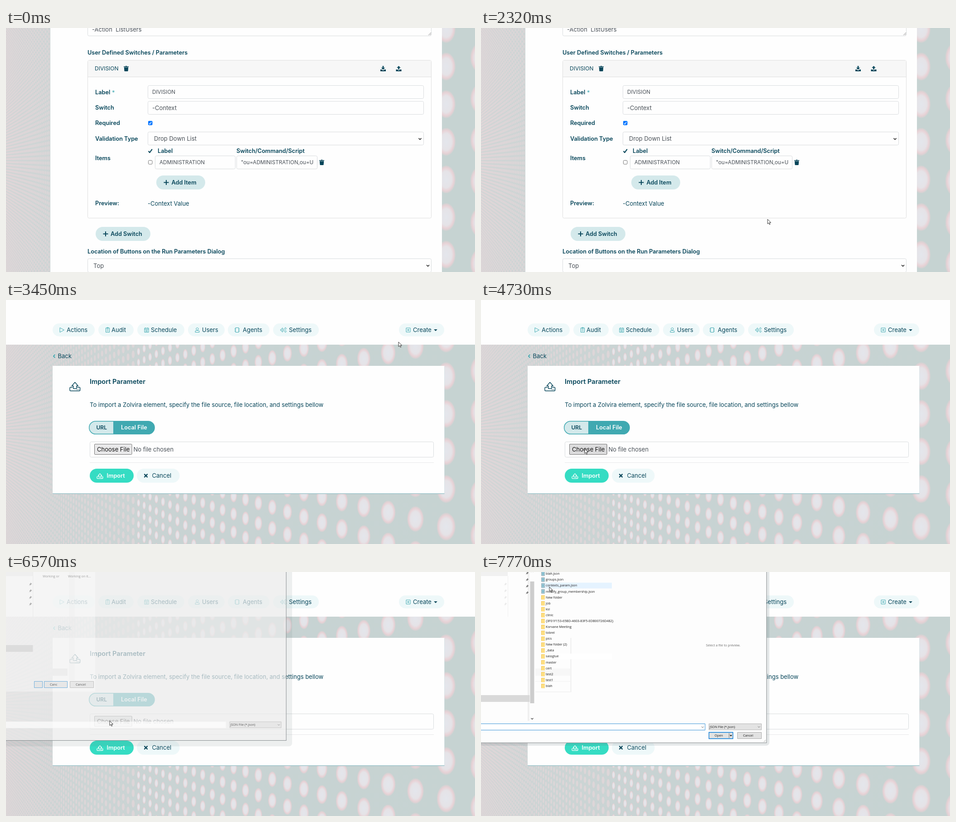
An HTML page with a canvas that plays this animation: 1036 px wide and 541 px high, repeating every 8000 ms.

```html
<!DOCTYPE html>
<html lang="en">
<head>
<meta charset="utf-8">
<title>Import parameter</title>
<style>
html, body { margin: 0; width: 100%; height: 100%; overflow: hidden; }
canvas { display: block; width: 1036px; height: 541px; }
</style>
</head>
<body>
<canvas id="stage" width="1036" height="541"></canvas>
<script>
const W = 1036, H = 541, LOOP = 8000;
const INK = '#07465a', TEAL = '#40a9b1', GREY = '#495057', LINE = '#d9dcde', PANEL = '#fefefe';
const UI = 'Inter, sans-serif', SYS = '"Open Sans", sans-serif';
const screen = document.getElementById('stage').getContext('2d');
let g = screen;

const clamp = v => Math.max(0, Math.min(1, v));
const ease = v => { v = clamp(v); return v * v * (3 - 2 * v); };

function layer(draw) {
  const c = document.createElement('canvas');
  c.width = W; c.height = H;
  g = c.getContext('2d');
  draw();
  g = screen;
  return c;
}

function rect(x, y, w, h, fill) {
  g.fillStyle = fill;
  g.fillRect(x, y, w, h);
}

function box(x, y, w, h, r, fill, stroke, width = 1) {
  g.beginPath();
  g.roundRect(x, y, w, h, r);
  if (fill) { g.fillStyle = fill; g.fill(); }
  if (stroke) { g.strokeStyle = stroke; g.lineWidth = width; g.stroke(); }
}

function text(s, x, y, color = INK, size = 13, weight = 400, family = UI) {
  g.font = `${weight} ${size}px ${family}`;
  g.fillStyle = color;
  g.fillText(s, x, y + size * 0.35);
}
const bold = (s, x, y, color = INK, size = 12.7) => text(s, x, y, color, size, 600);
const small = (s, x, y, color = '#1b1b1b', size = 7.2) => text(s, x, y, color, size, 400, SYS);

// Icons are centred on (x, y); a zero width means filled.
function icon(d, x, y, color, width = 0, scale = 1) {
  g.save();
  g.translate(x, y);
  g.scale(scale, scale);
  const p = new Path2D(d);
  if (width) { g.strokeStyle = color; g.lineWidth = width; g.lineJoin = 'round'; g.stroke(p); }
  else { g.fillStyle = color; g.fill(p); }
  g.restore();
}

const TRASH = 'M-5.5-5h3.5l.8-1h2.4l.8 1h3.5v1.5h-11zM-4.7-2.7h9.4l-.6 7.6q-.1 1.1-1.2 1.1h-5.8q-1.1 0-1.2-1.1z';
const TRAY = 'M-6 2h3.2l1.6 1.7h2.4l1.6-1.7h3.2v4h-12z';
const DOWN = TRAY + 'M-1.3-6h2.6v4h3l-4.3 4.4-4.3-4.4h3z';
const UP = TRAY + 'M-1.3 2.2h2.6v-3.8h3l-4.3-4.4-4.3 4.4h3z';
const UPLOAD = 'M-3.5 6v-6h-3.5l7-8 7 8h-3.5v6zM-5 3h-4.5q-1.8 0-1.8 1.8v4.4q0 1.8 1.8 1.8h19q1.8 0 1.8-1.8v-4.4q0-1.8-1.8-1.8h-4.5M4 8h1.6M7.5 8h1.6';
const PLUS = 'M-5.5 0h11M0-5.5v11';
const CHEVRON = 'M-3-1.6l3 3 3-3';
const CROSS = 'M-3.6-3.6l7.2 7.2M3.6-3.6l-7.2 7.2';
const TICK = 'M-4.3.5l2.8 3.2 5.3-7.6';
const POINTER = 'M0 0v10.3l2.4-2.2 1.8 3.8 1.6-.8-1.7-3.6h3.3z';
const PIN = 'M0-3.5l3.5 3-1.3.2-1.5 1.7-.2 1.4-1.2-1.2-2.7 2.2 2-2.9-1.2-1.3 1.4-.2 1.3-1.5z';

// Perspective wall of glowing dots that shrink towards the left.
function drawWall() {
  const base = g.createLinearGradient(0, 0, W, 0);
  base.addColorStop(0, '#cfd5d5');
  base.addColorStop(0.4, '#c8d3d3');
  base.addColorStop(1, '#c6d3d2');
  rect(0, 0, W, H, base);
  for (let u = 15; u < 104; u++) {
    const d = 18436 / u, x = d - 180;
    const gapX = d * d / 18436, gapY = 84 * (d / 1158) ** 1.4;
    const rx = Math.max(1.2, gapX * 0.25), ry = gapY * 0.32;
    const rows = Math.ceil(300 / gapY);
    for (let j = -rows; j < rows; j++) {
      g.save();
      g.translate(x, 294 + (j + 0.5) * gapY);
      g.scale(rx, ry);
      if (rx > 3) {
        const glow = g.createRadialGradient(0, 0, 0, 0, 0, 1.15);
        glow.addColorStop(0, '#e4e6ec');
        glow.addColorStop(0.6, '#e5e3e7');
        glow.addColorStop(0.83, '#e8d2d6');
        glow.addColorStop(1, '#e2d0d360');
        glow.addColorStop(1, '#e2d0d300');
        g.fillStyle = glow;
      } else g.fillStyle = '#e5d6d9b0';
      g.beginPath();
      g.arc(0, 0, 1.15, 0, 7);
      g.fill();
      g.restore();
    }
  }
}

function field(x, y, w, value, h = 30) {
  box(x + .5, y + .5, w - 1, h - 1, 3, PANEL, LINE);
  if (!value) return;
  g.save();
  g.beginPath(); g.rect(x + 8, y, w - 17, h); g.clip();
  const caps = value.includes('ADMIN') || value === 'DIVISION';
  text(value, x + 10, y + h / 2, GREY, caps ? 11.7 : 13);
  g.restore();
}

function pill(x, y, w, h, fill) { box(x, y, w, h, h / 2, fill); }

function drawForm() {
  g.drawImage(wall, 0, 0);
  rect(98, 0, 865, H, PANEL);
  field(180, -40, 760, '', 58);
  text('-Action  ListUsers', 190, 3, GREY);
  icon('M-3 3l6-6M0 3l3-3', 936, 13, '#777', .8);
  bold('User Defined Switches / Parameters', 180, 55);

  box(180.5, 71.5, 759, 350, 3, PANEL, '#dfdfdf');
  rect(181, 72, 758, 37, '#f7f7f7');
  rect(181, 108, 758, 1, '#dfdfdf');
  text('DIVISION', 196, 90, INK, 12);
  icon(TRASH, 265.5, 90, INK);
  icon(DOWN, 833, 90, INK);
  icon(UP, 867.5, 90, INK);

  [['Label', 143], ['Switch', 177], ['Required', 211], ['Validation Type', 246], ['Items', 289], ['Preview:', 389]]
    .forEach(([s, y]) => bold(s, 197, y));
  text('*', 234, 143, TEAL);
  field(313, 127, 610, 'DIVISION');
  field(313, 162, 610, '-Context');
  box(314, 206, 9.5, 9.5, 2, '#0075ff');
  icon(TICK, 318.7, 211, '#fff', 2, .65);
  field(313, 230, 610);
  text('Drop Down List', 327, 245, GREY);
  icon(CHEVRON, 914.5, 246, '#333', 1.6);

  icon(TICK, 319, 272.5, INK, 2.2);
  bold('Label', 335, 273);
  bold('Switch/Command/Script', 509, 273);
  box(314.5, 293.5, 8.5, 8.5, 2, '#fff', '#767676');
  field(329, 283, 178, 'ADMINISTRATION');
  field(509, 283, 179, '"ou=ADMINISTRATION,ou=USERS');
  icon(TRASH, 697.5, 298, INK);

  pill(332, 327, 108, 31, '#d4e9eb');
  icon(PLUS, 354, 342.5, INK, 2);
  bold('Add Item', 365.5, 342.5);
  text('-Context Value', 313, 389);
  pill(198, 441, 121, 31, '#d4e9eb');
  icon(PLUS, 220, 456.5, INK, 2);
  bold('Add Switch', 231, 457);
  bold('Location of Buttons on the Run Parameters Dialog', 180, 496);
  field(180, 511, 760, '', 31);
  text('Top', 193, 527, GREY);
  icon(CHEVRON, 932, 527, '#333', 1.6);
}

const MENU = [
  ['Actions', 103, 93, 134, 'M-4.5-5l9.5 5-9.5 5z'],
  ['Audit', 204, 78, 233, 'M-4-4.5h8v9.5h-8zM-1.5-5.5h3v2h-3zM-2-1h4M-2 2h4'],
  ['Schedule', 290, 104, 320, 'M-4.5-4h9v9h-9zM-4.5-1.5h9M-2.5-5.5v2M2.5-5.5v2M-2.5.7h5M-2.5 3h5'],
  ['Users', 402, 81, 433, 'M0-5a2.6 2.6 0 1 0 .01 0M-4.5 5v-1.5q0-2.5 2.5-2.5h4q2.5 0 2.5 2.5v1.5z'],
  ['Agents', 490, 92, 523, 'M-3.5-5h7v10h-7zM-5.5-3h2M-5.5 0h2M-5.5 3h2M3.5-3h2M3.5 0h2M3.5 3h2'],
  ['Settings', 590, 101, 625, 'M-2.5-3.5a3.5 3.5 0 1 0 .01 0M-2.5-1.2a1.2 1.2 0 1 0 .01 0M-2.5-5v1.5M-2.5 3.5v1.5M-7.5 0h1.5M4.3-5a1.8 1.8 0 1 0 .01 0M4.3 1.2a1.8 1.8 0 1 0 .01 0M4.3-6v1M4.3 4.8v1'],
  ['Create', 868, 100, 899, 'M-4.5-4.5h9v9h-9zM-2.5 0h5M0-2.5v5']
];

function drawImport() {
  g.drawImage(wall, 0, 0);
  rect(0, 0, W, 99, PANEL);
  for (const [label, x, w, tx, d] of MENU) {
    pill(x, 52, w, 28.5, '#eef8f9');
    icon(d, x + (label === 'Settings' ? 23 : 20.5), 66.5, TEAL, 1);
    text(label, tx, 66.5);
  }
  icon('M-3.8-2h7.6l-3.8 4z', 949, 67, INK);
  icon('M1.8-3.5l-3.5 3.5 3.5 3.5', 106.5, 124.5, TEAL, 1.8);
  text('Back', 114.5, 124.5);

  rect(103, 147, 865.5, 283, '#8fbcc3');
  rect(103, 146, 865.5, 282.7, PANEL);
  icon(UPLOAD, 152.3, 190.5, INK, 1.4);
  bold('Import Parameter', 185, 181, INK, 14.6);
  text('To import a Zolvira element, specify the file source, file location, and settings bellow', 185, 232);

  box(183.7, 268.7, 144.4, 28.6, 14.3, '#d3e9eb');
  box(237, 268.7, 91, 28.6, [0, 14.3, 14.3, 0], TEAL);
  box(183.7, 268.7, 144.4, 28.6, 14.3, null, TEAL, 1.5);
  bold('URL', 199.5, 283, INK, 12);
  bold('Local File', 254, 283, '#fff');

  field(185, 314, 760, '', 35);
  chooseButton('#e9e9ea');
  text('No file chosen', 281.5, 331.5, GREY);
  rect(185, 360, 760, 1, '#e7e8e9');
  pill(185, 374, 97, 31, '#35dcc3');
  icon(UPLOAD, 207.5, 389.5, '#fff', 2, .58);
  bold('Import', 222.5, 389.5, '#fff');
  pill(289, 374, 94.5, 31, '#eef8f9');
  icon(CROSS, 309, 389.5, INK, 2.2);
  text('Cancel', 322.5, 389.5);
}

function chooseButton(fill) {
  box(195.5, 319.5, 82.5, 23, 1.5, fill, '#767676');
  text('Choose File', 201, 331.5, '#111');
}

const FILES = ['blah.json', 'groups.json', 'contexts_param.json', 'modify_group_membership.json',
  'New folder', 'job', 'ksl', 'clinic', '{3F01F153-65BD-4603-83F5-EDB00726D482}', 'Korvane Meeting',
  'tobrel', 'pics', 'New folder (2)', '_data', 'sassglue', 'master', 'cert', 'test2', 'test1', 'blah'];

function fileIcon(i, y, typed) {
  if (i > 3) {
    rect(133, y - 4.5, 8, 9.5, '#f0c75a');
    rect(134, y - 3.5, 7, 8.5, '#ffdf83');
  } else {
    box(133.5, y - 4.5, 7, 9, .5, typed ? '#a9d8e6' : '#fff', '#8b9297', .8);
    if (typed) icon('M-2-2h4M-2 0h4M-2 2h4', 137, y, '#4a879b', .7);
  }
}

function drawList(t, pointer) {
  const over = Math.round((pointer.y - 3.8) / 13.08);
  if (t > 7400) rect(142, 181, 147, 12.5, '#fff');
  FILES.forEach((name, i) => {
    const y = 3.8 + 13.08 * i;
    if (t > 6760 && i === over) rect(133, y - 6.3, 156, 12.8, '#e5f3ff');
    fileIcon(i, y, t > 6800);
    small(name, 143, y);
  });
  icon('M-2.5 1l2.5-2.5 2.5 2.5', 113, -1, '#555', 1.3);
  icon('M-2.5-1l2.5 2.5 2.5-2.5', 113, 325, '#555', 1.3);
  rect(108.5, 21, 9, 270, '#cdcdcd');
  small('Select a file to preview.', 497, 162, '#6d6d6d');
}

function drawGhosts() {
  rect(0, 0, 59, 9, '#f1f1f1');
  rect(59, 9, 1, 90, '#f0f0f0');
  rect(103, 0, 4, 330, '#f0f0f0');
  rect(120, 214, 79, 16, '#f7f7f7');
  rect(120, 242, 80, 1, '#f1f1f1');
  rect(197, 146, 3, 120, '#f3f3f3');
  rect(120, 265, 80, 1.5, '#f1f1f1');
  for (let i = 0; i < 4; i++) {
    icon(PIN, 54, 27 + 14.7 * i, '#e9e9e9');
    icon(PIN, 102, 2.5 + 14.5 * i, '#777');
  }
  rect(0, 273, 107.5, 15, '#d9d9d9');
}

function button(label, x, y, w, border, width = 1) {
  box(x + .5, y + .5, w - 1, 14, 0, '#e2e2e2', border, width);
  small(label, x + 13, y + 7.5);
}

// Half-loaded contents seen while the file window fades in.
function drawLoading() {
  rect(0, 0, 197, 265, '#ffffff80');
  rect(139, 0, 13, 240, '#e9e9e980');
  rect(0, 0, 59, 9, '#eeeeee');
  rect(59, 0, 1, 99, '#e4e4e4');
  rect(0, 162, 59.5, 15, '#d5d5d5');
  rect(103, 214, 33, 16, '#eaeaea');
  small('Working or', 81, 9, '#777');
  small('Working on it...', 137, 9, '#777');
  for (let i = 0; i < 4; i++) icon(PIN, 54, 27 + 14.7 * i, '#888');
  button('', 62, 242, 19, '#3b95d8');
  button('Canc', 84, 242, 52, '#3b95d8');
  button('Cancel', 141, 242, 53, '#adadad');
}

function drawDialog(t, pointer) {
  const scale = 1 - 0.019 * Math.exp((6570 - t) / 60);
  const opacity = clamp((t - 6480) / 135);
  const loading = t < 6650;
  g.save();
  g.translate(0, 100);
  g.scale(scale, scale);
  g.translate(0, -100);
  g.globalAlpha = opacity;
  box(-20, -20, loading ? 664 : 657, loading ? 412 : 405, 7, '#5b6a7026');
  rect(-20, -20, 651, 399, loading ? '#f2f2f2' : '#fdfdfd');
  g.globalAlpha = 1;
  if (!loading) { drawGhosts(); drawList(t, pointer); }
  g.globalAlpha = opacity;
  box(-20, 336.5, 515, 14, 0, '#fff', loading ? '#f8f8f8' : '#3b95d8');
  box(503.5, 336.5, 116, 13.5, 0, '#e3e3e3', '#b5b5b5');
  small('JSON File (*.json)', 505, 343.5);
  icon(CHEVRON, 614, 343.5, '#555', 1, .8);
  if (!loading) {
    icon(CHEVRON, 489.5, 344, '#333', 1, .8);
    button('Open', 503, 355, 54, '#0078d7', 1.3);
    rect(547.5, 357, 1, 11, '#777');
    icon('M-2.8-1.5h5.6l-2.8 3z', 552, 363, '#111');
    button('Cancel', 566, 355, 54, '#adadad');
    icon('M-2.5 2.5l5-5M0 2.5l2.5-2.5', 626.5, 374.5, '#aaa', .8);
  }
  g.globalAlpha = 1;
  rect(630.3, -20, 1, 399, '#858b8d');
  rect(-20, 378.2, 651, 1, '#858b8d');
  g.restore();
  if (loading) {
    g.globalAlpha = opacity;
    drawLoading();
    g.globalAlpha = 1;
  }
}

// Pointer legs: start, end, then the point reached.
const LEGS = [[1270, 1710, 632, 425], [1910, 1911, 633, 424], [2320, 2910, 867, 93],
  [4090, 4730, 229, 330], [6695, 6900, 215, 3], [7510, 7770, 151, 33]];

function pointerAt(t) {
  let x = 906, y = 515;
  for (const [from, to, nx, ny] of LEGS) {
    const k = ease((t - from) / (to - from));
    x += (nx - x) * k;
    y += (ny - y) * k;
  }
  return { x, y };
}

const wall = layer(drawWall);
const formPage = layer(drawForm);
const importPage = layer(drawImport);

function render(t) {
  const pointer = pointerAt(t);
  const turned = clamp((Math.floor((t - 3350) / 50) + 1) / 3);
  g.drawImage(formPage, 0, 0);
  if (turned > 0) {
    g.globalAlpha = turned;
    g.drawImage(importPage, 0, 0);
    g.globalAlpha = 1;
  }
  if (t >= 4690) chooseButton(t > 5980 && t < 6100 ? '#f0f0f1' : '#dcdcdd');
  const tip = t < 5270 ? 0 : 1 - clamp((t - 5980) / 180);
  if (tip > 0) {
    g.globalAlpha = tip;
    box(234.5, 339.5, 80, 15, 0, '#fff', '#767676');
    small('No file chosen', 239, 347, '#575757', 9.5);
    g.globalAlpha = 1;
  }
  if (t >= 6520) drawDialog(t, pointer);
  if (t >= 1270) {
    icon(POINTER, pointer.x, pointer.y, '#fff');
    icon(POINTER, pointer.x, pointer.y, '#222', .9);
  }
}

function tick() {
  render(performance.now() % LOOP);
  requestAnimationFrame(tick);
}
tick();
</script>
</body>
</html>
```
